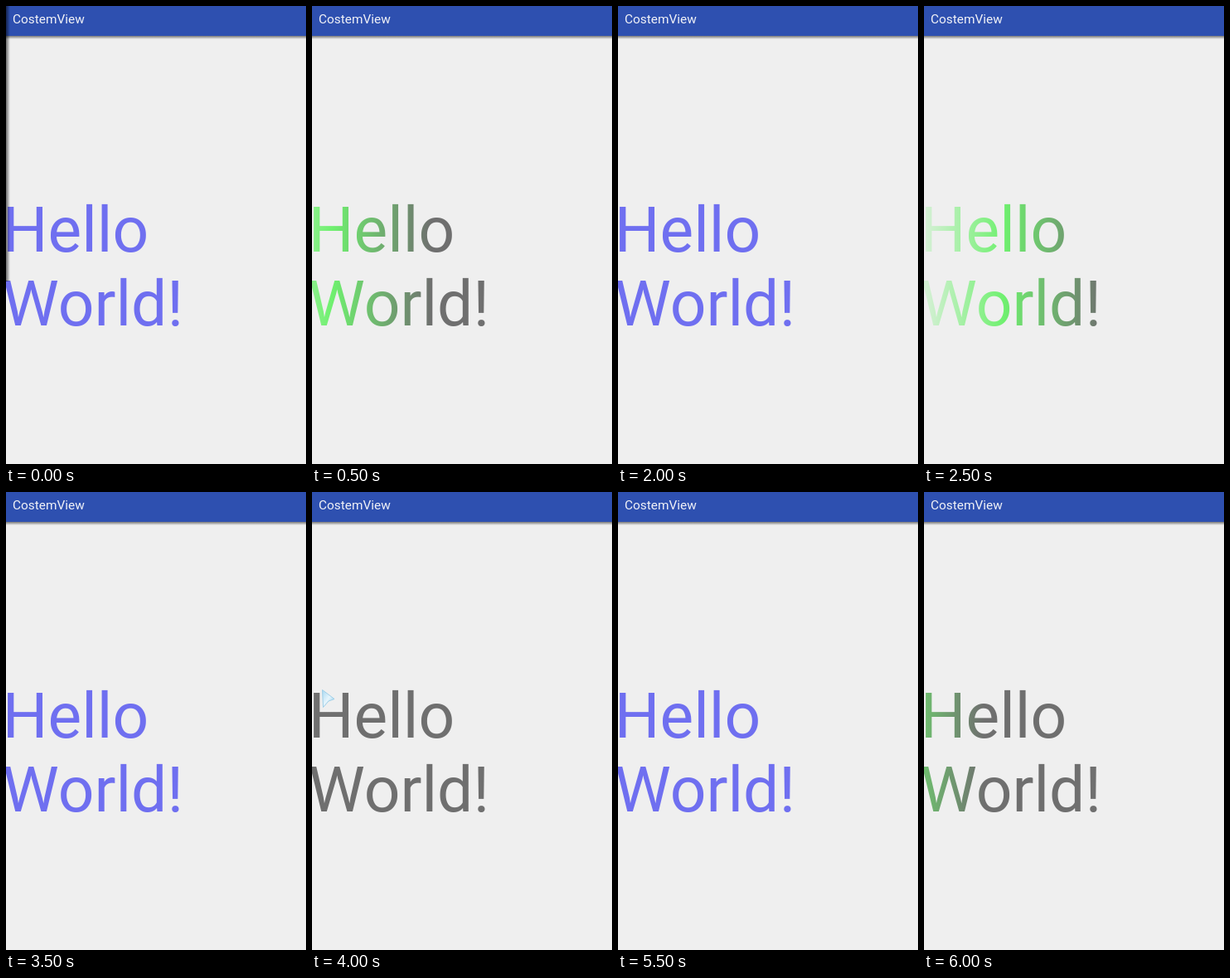
Animation, 362 px wide and 552 px high, one loop 7000 ms. Source, as an HTML page:

```html
<!DOCTYPE html>
<html lang="en">
<head>
<meta charset="utf-8">
<title>Gradient text</title>
<style>
  html, body { margin: 0; width: 100%; height: 100%; overflow: hidden; background: #efefef; }
  svg { display: block; width: 362px; height: 552px; }
  text { font-family: Roboto, sans-serif; }
  .greeting { font-size: 76.7px; fill: url(#sweep); }
</style>
</head>
<body>
<svg viewBox="0 0 362 552">
  <defs>
    <linearGradient id="sweep" gradientUnits="userSpaceOnUse" y1="0" y2="0">
      <stop offset="0" stop-color="#6f6ff0"/>
      <stop offset=".3333" stop-color="#f0f0f0"/>
      <stop offset=".6667" stop-color="#6ff06f"/>
      <stop offset="1" stop-color="#6f6f6f"/>
    </linearGradient>
    <linearGradient id="barShadow" x2="0" y2="1">
      <stop offset="0" stop-color="#000" stop-opacity=".5"/>
      <stop offset="1" stop-color="#000" stop-opacity="0"/>
    </linearGradient>
    <linearGradient id="edgeShadow">
      <stop offset="0" stop-color="#000" stop-opacity=".55"/>
      <stop offset="1" stop-color="#000" stop-opacity="0"/>
    </linearGradient>
    <linearGradient id="glass" x2="1" y2="1">
      <stop offset="0" stop-color="#a9d9f2"/>
      <stop offset=".5" stop-color="#e6f5fc"/>
      <stop offset="1" stop-color="#7cc4ea"/>
    </linearGradient>
  </defs>

  <rect width="362" height="552" fill="#efefef"/>
  <rect y="36" width="362" height="4" fill="url(#barShadow)"/>
  <rect width="362" height="36" fill="#2e50b0"/>
  <text x="8" y="21" font-size="15.4" fill="#f1f2f7">CostemView</text>

  <text class="greeting" x="-4.2" y="296">Hello</text>
  <text class="greeting" x="-4.2" y="385.3">World!</text>

  <rect id="edge" width="5" height="332" fill="url(#edgeShadow)"/>
  <path id="pointer" d="M12.5 238.5 L27 249.5 L20 252 L13.5 259.5 Z"
        fill="url(#glass)" stroke="#9fcfe8" stroke-linejoin="round"/>
</svg>

<script>
  const LOOP = 7000, WIDTH = 362, STEP = WIDTH / 5;

  // start time in ms, gradient position in fifths of the width
  const steps = [
    [0, 9], [500, 2], [1500, 7], [2000, 9], [2500, 3],
    [3500, 8], [4000, -3], [5000, 5], [5500, 10], [6000, 1]
  ];

  const byId = id => document.getElementById(id);
  const sweep = byId('sweep'), edge = byId('edge'), pointer = byId('pointer');
  const show = (node, on) => node.setAttribute('visibility', on ? 'visible' : 'hidden');

  function draw(t) {
    const [start, position] = steps.filter(([time]) => time <= t).pop();
    const end = position * STEP;
    sweep.setAttribute('x1', end - WIDTH);
    sweep.setAttribute('x2', end);
    show(edge, start === 0);
    show(pointer, start === 4000);
  }

  const origin = performance.now();
  function tick() {
    draw((performance.now() - origin) % LOOP);
    requestAnimationFrame(tick);
  }
  tick();
</script>
</body>
</html>
```
